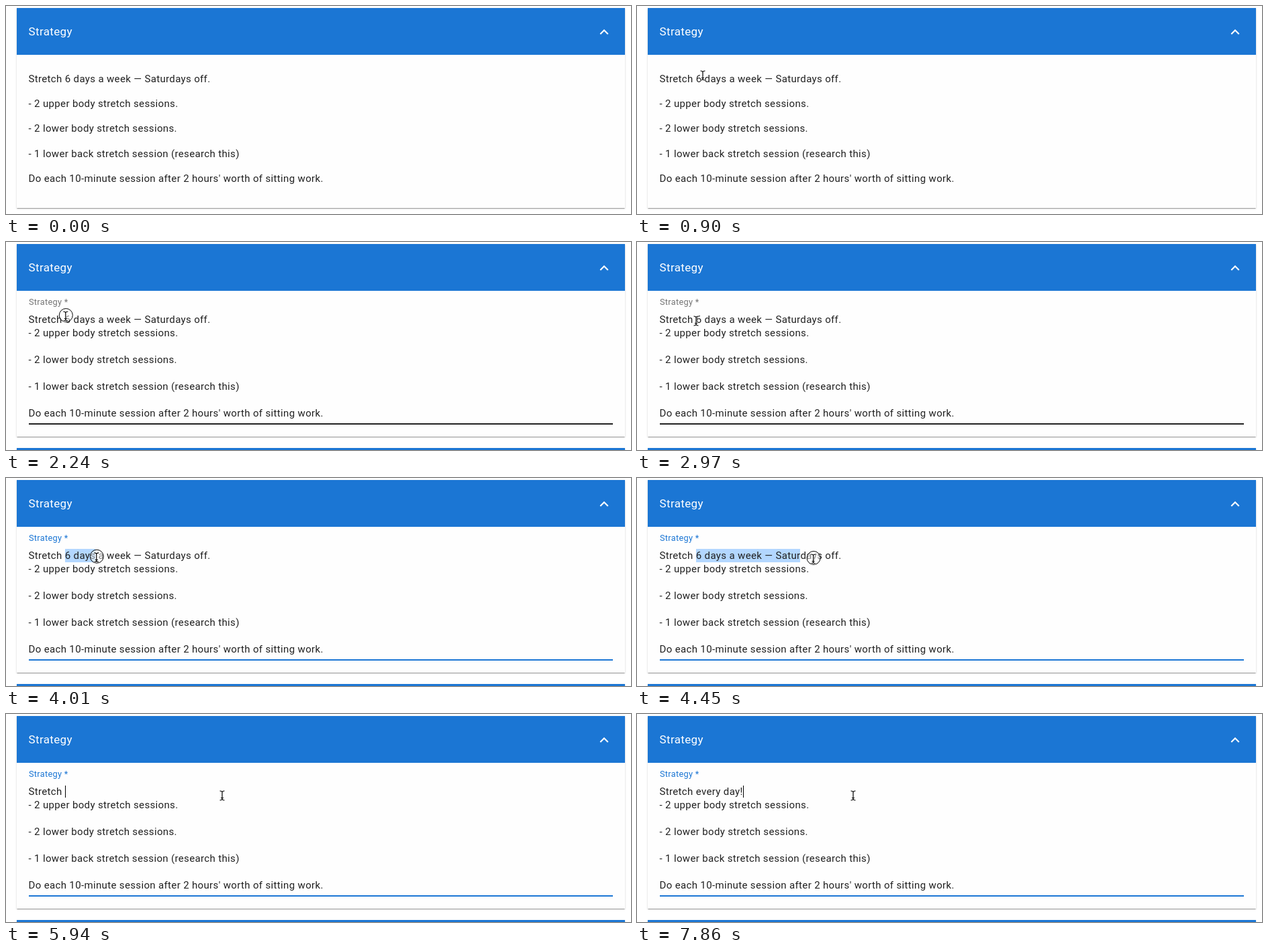
Animation of 931 by 311 pixels, one loop 8000 ms. Source, as an HTML page:

```html
<!DOCTYPE html>
<html lang="en">
<head>
<meta charset="utf-8">
<title>Strategy panel</title>
<style>
  html, body { margin: 0; width: 100%; height: 100%; overflow: hidden; background: #fff; }
  body { --blue: #1b76d4; position: relative; font: 15px/20px Roboto, sans-serif; letter-spacing: .35px; color: #212121; }
  body * { position: absolute; }
  .card { left: 16px; width: 906px; background: #fefefe;
    box-shadow: 0 2px 1px -1px rgba(0,0,0,.2), 0 1px 1px rgba(0,0,0,.14), 0 1px 3px rgba(0,0,0,.12); }
  #card { top: 3px; height: 299px; }
  #next { top: 308px; height: 70px; background: var(--blue); }
  #head { width: 906px; height: 70px; background: var(--blue); color: #fff; font-size: 17px; line-height: 70px; text-indent: 17.6px; }
  #head svg { left: 862px; top: 22.5px; }
  #view, #text { left: 17.5px; white-space: pre; }
  #view { top: 87.6px; line-height: 37.4px; }
  #text { top: 103px; }
  #text span { position: static; }
  #sel { display: inline-block; height: 20px; vertical-align: top; background: #b3d7ff; }
  #caret { display: inline-block; width: 1px; height: 18px; margin: 1px -1px 0 0; vertical-align: top; background: #000; }
  #label { left: 18px; top: 77px; font-size: 12.75px; letter-spacing: .3px; white-space: pre; color: #757575; }
  #line { left: 18px; top: 267.5px; width: 870px; height: 2px; background: #212121; }
  .focus #label { color: var(--blue); }
  .focus #line { background: var(--blue); }
  #mouse { left: 0; top: 0; overflow: visible; }
</style>
</head>
<body>
<div id="card" class="card">
  <div id="head">Strategy<svg width="26" height="26" viewBox="0 0 24 24" fill="#fff"><path d="M12 8l-6 6 1.41 1.41L12 10.83l4.59 4.58L18 14z"/></svg></div>
  <div id="view"></div>
  <div id="edit">
    <div id="label">Strategy *</div>
    <div id="text"><span id="before"></span><span id="sel"></span><span id="caret"></span><span id="after"></span></div>
    <div id="line"></div>
  </div>
</div>
<div id="next" class="card"></div>
<svg id="mouse" width="1" height="1" fill="none">
  <defs><path id="beam" d="M-3.5-7Q0-7 0-4.5V4.5Q0 7-3.5 7M3.5-7Q0-7 0-4.5V4.5Q0 7 3.5 7M-2 3.5H2"/></defs>
  <circle id="ring" cx=".5" cy="-1.5" r="10" fill="rgba(255,255,255,.45)" stroke="#000"/>
  <use href="#beam" stroke="#fff" stroke-width="2.6"/>
  <use href="#beam" stroke="#000" stroke-width="1.2"/>
</svg>
<script>
const $ = id => document.getElementById(id);

// The screen refreshes once per STEP; the moments below count steps.
const LOOP = 8000, STEP = 148.2;
const APPEAR = 3, CLICK = 14, EDIT = 15, DRAG = 24, DROP = 31, RELEASE = 35, DELETE = 40, TYPE = 42;

const start = 'Stretch ', old = '6 days a week — Saturdays off.', fresh = 'every day!';
const rest = ['- 2 upper body stretch sessions.', '- 2 lower body stretch sessions.',
  '- 1 lower back stretch session (research this)',
  "Do each 10-minute session after 2 hours' worth of sitting work."];

// Mouse stops: step, x, y
const stops = [[APPEAR, 77, 116], [6, 98, 104], [7, 98, 104], [12, 89, 111], [17, 88.5, 111],
  [20, 88, 118], [DRAG, 88, 118], [DROP, 322, 122]];

const show = (id, on) => $(id).style.display = on ? '' : 'none';
const progress = (k, from, to) => Math.min(1, Math.max(0, (k - from) / (to - from))) ** 1.9;

function mouseAt(k) {
  let [from, x, y] = stops[0];
  for (const [to, x2, y2] of stops.slice(1)) {
    const p = progress(k, from, to);
    x += (x2 - x) * p;
    y += (y2 - y) * p;
    from = to;
  }
  return [x, y];
}

function selected(k) {
  if (k < DRAG || k >= DELETE) return 0;
  return k > DROP ? old.length + 1 : Math.round((old.length - 2) * progress(k, DRAG, DROP));
}

$('view').textContent = [start + old, ...rest].join('\n');

function draw(t) {
  const k = Math.floor((t + 6) / STEP), edit = k >= EDIT, done = k >= DELETE;
  show('view', !edit);
  show('edit', edit);
  show('next', edit);
  $('card').style.height = (edit ? 288 : 299) + 'px';
  $('edit').className = k >= DRAG ? 'focus' : '';

  const n = selected(k), typed = Math.max(0, Math.ceil((k - TYPE) * 0.9));
  $('before').textContent = start + fresh.slice(0, typed);
  $('sel').textContent = (old + ' ').slice(0, n);
  $('after').textContent = (done ? '' : old.slice(n)) + '\n' + rest.join('\n\n');
  show('sel', n);
  show('caret', done);

  const [x, y] = mouseAt(k);
  $('mouse').style.transform = `translate(${x}px, ${y}px)`;
  show('mouse', k >= APPEAR);
  show('ring', (k >= CLICK && k < CLICK + 2) || (k >= DRAG && k < RELEASE));
}

function tick() {
  draw(performance.now() % LOOP);
  requestAnimationFrame(tick);
}
tick();
</script>
</body>
</html>
```
